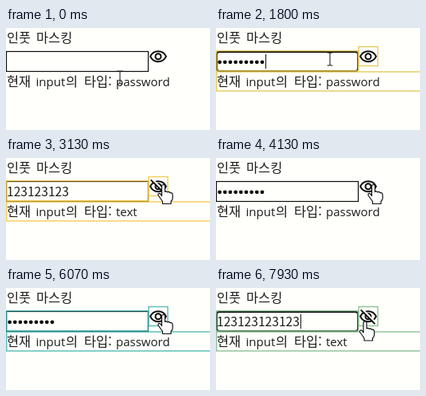
Recreate the animation shown at these times as an HTML page. Size 256 by 128 pixels, loop 8 s.

```html
<!DOCTYPE html>
<html lang="ko">
<head>
<meta charset="utf-8">
<title>인풋 마스킹</title>
<style>
  html, body { margin: 0; width: 100%; height: 100%; overflow: hidden; background: #fffffb; }
  svg { display: block; width: 256px; height: 128px; }
  text { font: 15px "Open Sans", "Noto Sans", sans-serif; fill: #1c1c1c; }
  .ko { font: 300 16.4px "Noto Sans CJK KR", "Noto Sans CJK", sans-serif; }
  #value { font: 15.6px "Noto Sans CJK KR", "Noto Sans CJK", sans-serif; }
  .icon { fill: none; stroke: #0c0c0c; stroke-width: 2; }
  #marks rect { fill: none; stroke-width: 1.5; stroke-opacity: .8; }
  #cursors path { stroke: #111; stroke-linejoin: round; stroke-linecap: round; }
</style>
</head>
<body>
<svg viewBox="0 0 256 128">
  <rect width="256" height="128" fill="#fffffb"/>
  <text class="ko" x="1" y="18">인풋</text>
  <text class="ko" x="38" y="18">마스킹</text>

  <rect id="box" fill="#fffffb" stroke="#0c0c0c"/>
  <text id="value" x="1" y="47.7"></text>
  <g id="dots" fill="#0c0c0c"></g>
  <rect id="caret" y="33" width="1" height="18" fill="#0c0c0c"/>

  <g class="icon" transform="translate(179 24.2)">
    <path d="M2.1 11.5C3.9 7.5 7.5 5 12 5s8.1 2.5 9.9 6.5C20.1 15.5 16.5 18 12 18S3.9 15.5 2.1 11.5z"/>
    <circle cx="12" cy="11.5" r="3.5"/>
    <g id="slash">
      <path d="M4 1.8L21.9 19.7" stroke="#fffffb"/>
      <path d="M2.7 3.2L20.4 20.9"/>
    </g>
  </g>

  <text class="ko" x="1" y="73">현재</text>
  <text x="37.5" y="73">input</text>
  <text class="ko" x="75" y="73">의</text>
  <text class="ko" x="98" y="73">타입:</text>
  <text id="type" x="138" y="73"></text>

  <g id="marks">
    <rect x=".75" y="28.75" width="177.5" height="25"/>
    <rect x="179" y="23.5" width="24" height="24"/>
    <rect x=".75" y="55" width="262" height="24"/>
  </g>

  <g id="cursors">
    <path id="beam" d="M-3-8h2q1 0 1 1q0-1 1-1h2M0-7V7M-3 8h2q1 0 1-1q0 1 1 1h2" fill="none"/>
    <path id="arrow" d="M0 0V16.5L3.8 12.8 6.5 19 9 18 6.3 11.8H11.6z" fill="#fff"/>
    <path id="hand" fill="#fff" stroke-width="1.2"
      d="M-2 1Q-2-1 0-1T2 1V8Q3 6.5 5.3 8.4Q7 7.3 8.4 9.2Q11.6 8.5 11.6 12V16Q11.6 18 9.5 20V23H-1V20L-6 13Q-7.4 10.5-5.6 10T-2 13z"/>
  </g>
</svg>
<script>
const LOOP = 8000, LAG = 35, HOLD = 250, BLINK = 560;
const BLUR = 2870;

const run = (n, from, gap) => Array.from({ length: n }, (_, i) => from + i * gap);
const keys = [...run(9, 970, 95), ...run(3, 7430, 100)];
const toggles = [3070, 4130, 4650, 5130, 5560, 6030, 6600];
const focusTimes = [600, 7310];
const updates = [...keys, ...toggles, BLUR].sort((a, b) => a - b);

// pointer moves; bow bends the path downwards
const moves = [
  { from: 30, to: 670, x: 143, y: 39, bow: -25 },
  { from: 1800, to: 2680, x: 197.5, y: 34.5, bow: 60 },
  { from: 6870, to: 7030, x: 150, y: 28, bow: 0 },
  { from: 7200, to: 7310, x: 141, y: 42, bow: 0 },
  { from: 7680, to: 7930, x: 187, y: 43, bow: 0 }
];

const $ = id => document.getElementById(id);
const show = (el, on) => el.setAttribute('visibility', on ? 'visible' : 'hidden');
const setAll = (el, attrs) => { for (const k in attrs) el.setAttribute(k, attrs[k]); };
const past = (list, t) => list.filter(k => k <= t);

const dots = keys.map((_, i) => {
  const c = document.createElementNS('http://www.w3.org/2000/svg', 'circle');
  setAll(c, { cx: 4.6 + i * 6.67, cy: 42.8, r: 2.4 });
  return $('dots').appendChild(c);
});

function pointer(t) {
  let x = 143, y = 62;
  for (const m of moves) {
    const k = Math.min(1, Math.max(0, (t - m.from) / (m.to - m.from)));
    const e = k * k * (3 - 2 * k);
    x += (m.x - x) * e;
    y += (m.y - y) * e + m.bow * Math.sin(Math.PI * e);
  }
  return [x, y];
}

function shapeAt(x, y, textEnd) {
  const inside = (l, t, r, b) => x >= l && x < r && y >= t && y < b;
  if (inside(179, 24, 204, 49)) return 'hand';
  if (inside(0, 29, 179, 55) || inside(0, 55, textEnd, 79) || inside(0, 4, 86, 24)) return 'beam';
  return 'arrow';
}

// each update in a streak prolongs the outline and warms its colour
function outline(t) {
  let end = 0, count = 0;
  for (const u of past(updates, t - LAG)) {
    if (u > end) { end = u; count = 0; }
    end += HOLD;
    count++;
  }
  if (t >= end) return null;
  const k = (Math.min(count - 1, 9) / 9) ** 0.7;
  const mix = (a, b) => Math.round(a + (b - a) * k);
  return `rgb(${mix(55, 240)},${mix(175, 196)},${mix(169, 56)})`;
}

function draw(t) {
  const plain = past(toggles, t).length % 2 === 1;
  const typed = past(keys, t).length;
  const focusAt = past(focusTimes, t).pop();
  const focused = focusAt && !(focusAt < BLUR && t >= BLUR);

  $('value').textContent = plain ? '123'.repeat(4).slice(0, typed) : '';
  dots.forEach((d, i) => show(d, !plain && i < typed));
  $('type').textContent = plain ? 'text' : 'password';
  show($('slash'), plain);

  setAll($('box'), focused
    ? { x: 1, y: 30, width: 177, height: 24, rx: 3, 'stroke-width': 2 }
    : { x: .5, y: 29.5, width: 178, height: 25, rx: 0, 'stroke-width': 1.2 });

  const last = Math.max(focusAt || 0, ...past(keys, t));
  show($('caret'), focused && Math.floor((t - last) / BLINK) % 2 === 0);
  $('caret').setAttribute('x', 2 + typed * (plain ? 8.66 : 6.67));

  const color = outline(t);
  show($('marks'), color);
  if (color) $('marks').setAttribute('stroke', color);

  const [x, y] = pointer(t);
  const shape = shapeAt(x, y, plain ? 166 : 206);
  for (const id of ['beam', 'arrow', 'hand']) show($(id), id === shape);
  $('cursors').setAttribute('transform', `translate(${x.toFixed(1)} ${y.toFixed(1)})`);
}

const start = performance.now();
function tick() {
  draw((performance.now() - start) % LOOP);
  requestAnimationFrame(tick);
}
tick();
</script>
</body>
</html>
```
